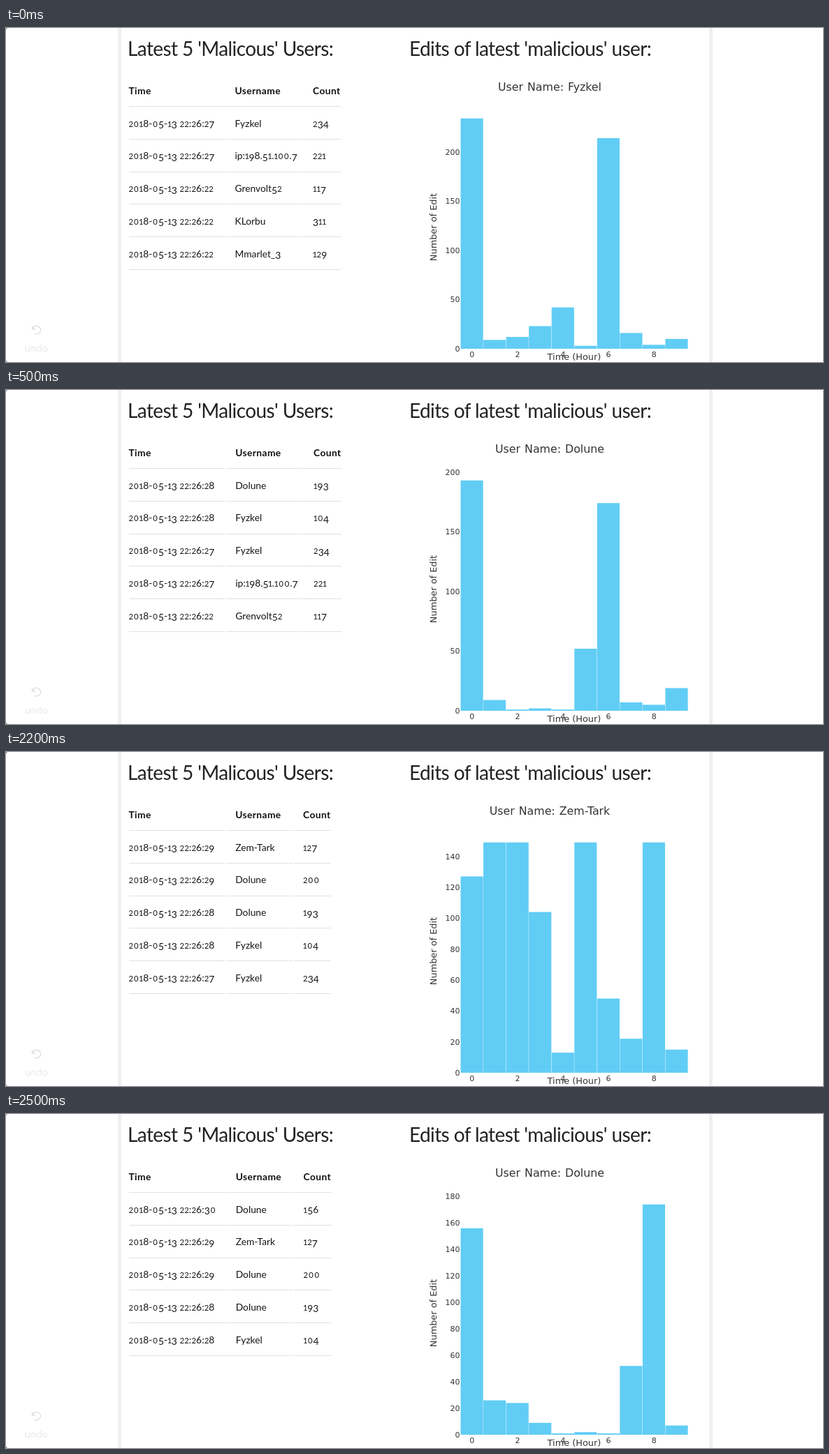
These frames come from a looping animation (1169 px wide and 479 px high, 2.8 s). An HTML page:

```html
<!DOCTYPE html>
<html lang="en">
<head>
<meta charset="utf-8">
<title>Latest users</title>
<style>
  html, body { margin: 0; width: 100%; height: 100%; overflow: hidden; background: #fff; }
  #stage { position: relative; width: 1169px; height: 479px; overflow: hidden; }
  #stage > * { position: absolute; left: 0; top: 0; }
  svg { display: block; }
  .page, .cell { font-family: Lato, sans-serif; }
  .head { font-size: 28px; letter-spacing: -.6px; fill: #222; }
  .undo { font-size: 14px; font-weight: 300; letter-spacing: .5px; fill: #d8d8d8; }

  .strip { animation: 2800ms step-end infinite; }
  #tables { animation-name: tables; }
  #charts { animation-name: charts; }
  @keyframes tables {
    0% { transform: translateY(0); }
    14.2857% { transform: translateY(-479px); }
    50% { transform: translateY(-958px); }
    85.714% { transform: translateY(-1437px); }
  }
  @keyframes charts {
    0% { transform: translateY(0); }
    17.857% { transform: translateY(-479px); }
    57.142% { transform: translateY(-958px); }
    89.285% { transform: translateY(-1437px); }
  }

  .table { position: relative; width: 600px; height: 479px; }
  .cell { position: absolute; height: 46px; line-height: 46px; font-size: 13.8px; color: #151515; white-space: pre; }
  .th { font-weight: 700; letter-spacing: .4px; color: #111; }
  .num { letter-spacing: .1px; }
  .rule { position: absolute; height: 1px; background: #e1e1e1; }
  /* old-style figures */
  .small { font-size: .82em; }
  .zero { padding: 0 .08em; }
  .one { margin: 0 -.05em; }
  .low { position: relative; top: .18em; }

  .chart { font-family: "DejaVu Sans", Verdana, sans-serif; fill: #333; }
  .chart rect { fill: #61cdf5; }
  .title { font-size: 15.8px; word-spacing: 1px; }
  .axis { font-size: 12.9px; }
  .tick { font-size: 11px; }
  .mid { text-anchor: middle; }
  .end { text-anchor: end; }
</style>
</head>
<body>
<div id="stage">
  <svg class="page" width="1169" height="479">
    <path d="M160 0h5v479h-5zM1006 0h5v479h-5z" fill="#f0f0f0"/>
    <path d="M0 0h2L0 2zM0 479h2L0 477z" fill="#777"/>
    <text class="head" x="174" y="39.5">Latest 5 'Malicous' Users:</text>
    <text class="head" x="577" y="39.5">Edits of latest 'malicious' user:</text>
    <path d="M37.5 427.5v4.5h4.5M37.8 431.8A6 6 0 1 1 40.5 438.3" fill="none" stroke="#dedede" stroke-width="1.3"/>
    <text class="undo mid" x="43.7" y="463.5">undo</text>
  </svg>
  <div id="tables" class="strip"></div>
  <div id="charts" class="strip"></div>
</div>
<script>
  const A = 'Fyzkel', B = 'Dolune', C = 'Zem-Tark', IP = 'ip:198.51.100.7', D = 'Grenvolt52';

  // Each log entry: seconds, user, count; newest first.
  const log = [
    [30, B, 156], [29, C, 127], [29, B, 200], [28, B, 193], [28, A, 104],
    [27, A, 234], [27, IP, 221], [22, D, 117], [22, 'KLorbu', 311], [22, 'Mmarlet_3', 129]
  ];

  // first: newest visible entry; user, count: column x; gap1, gap2: rule breaks; end: rule end.
  const tables = [
    { first: 5, user: 327.5, count: 439, gap1: 312.5, gap2: 424.5, end: 479 },
    { first: 3, user: 328.2, count: 440, gap1: 313, gap2: 424.5, end: 480 },
    { first: 1, user: 328.2, count: 425, gap1: 313, gap2: 410, end: 465 },
    { first: 0, user: 328.7, count: 425.6, gap1: 313.5, gap2: 410, end: 466 }
  ];

  const charts = [
    { user: A, step: 50, edits: [234, 9, 12, 23, 42, 3, 214, 16, 4, 10] },
    { user: B, step: 50, edits: [193, 9, 1, 2, 1, 52, 174, 7, 5, 19] },
    { user: C, step: 20, edits: [127, 149, 149, 104, 13, 149, 48, 22, 149, 15] },
    { user: B, step: 20, edits: [156, 26, 24, 9, 1, 2, 1, 52, 174, 7] }
  ];

  const figureClass = d =>
    d === '0' ? 'small zero' : d === '1' ? 'small one' : d === '2' ? 'small' : 'low';
  const figures = s =>
    String(s).replace(/[0-579]/g, d => `<span class="${figureClass(d)}">${d}</span>`);

  const ROW = 46.7;
  const cell = (x, row, text, kind = '') =>
    `<div class="cell ${kind}" style="left:${x}px;top:${67 + row * ROW}px">${figures(text)}</div>`;
  const rule = (x0, x1, row) =>
    `<div class="rule" style="left:${x0}px;width:${x1 - x0}px;top:${Math.round(112.2 + row * ROW)}px"></div>`;

  function drawTable({ first, user, count, gap1, gap2, end }) {
    let out = cell(175.5, 0, 'Time', 'th') + cell(user, 0, 'Username', 'th') + cell(count, 0, 'Count', 'th');
    log.slice(first, first + 5).forEach(([sec, name, edits], i) => {
      out += cell(175.5, i + 1, `2018-05-13 22:26:${sec}`, 'num')
        + cell(user, i + 1, name) + cell(count, i + 1, edits, 'num');
    });
    for (let i = 0; i < 6; i++)
      out += rule(175.5, gap1, i) + rule(gap1 + 1.5, gap2, i) + rule(gap2 + 1.5, end, i);
    return `<div class="table">${out}</div>`;
  }

  const LEFT = 650.5, BASE = 460, FULL = 330.3, BAR = 32.55;
  const label = (x, y, text, kind) => `<text x="${x}" y="${y}" class="${kind}">${text}</text>`;

  function drawChart({ user, step, edits }) {
    const unit = FULL / Math.max(...edits);
    let out = label(778, 89.7, `User Name: ${user}`, 'title mid');
    edits.forEach((n, i) => {
      out += `<rect x="${LEFT + i * BAR}" y="${BASE - n * unit}" width="${BAR - .4}" height="${n * unit}"/>`;
    });
    for (let n = 0; n * unit < 345; n += step)
      out += label(649.5, BASE - n * unit + 4, n, 'tick end');
    for (let h = 0; h < 10; h += 2)
      out += label(LEFT + (h + .5) * BAR, 471.7, h, 'tick mid');
    out += label(813, 475.7, 'Time (Hour)', 'axis mid');
    out += `<text class="axis mid" transform="translate(615.7 285.5) rotate(-90)">Number of Edit</text>`;
    return `<svg class="chart" width="1169" height="479">${out}</svg>`;
  }

  document.getElementById('tables').innerHTML = tables.map(drawTable).join('');
  document.getElementById('charts').innerHTML = charts.map(drawChart).join('');
</script>
</body>
</html>
```
